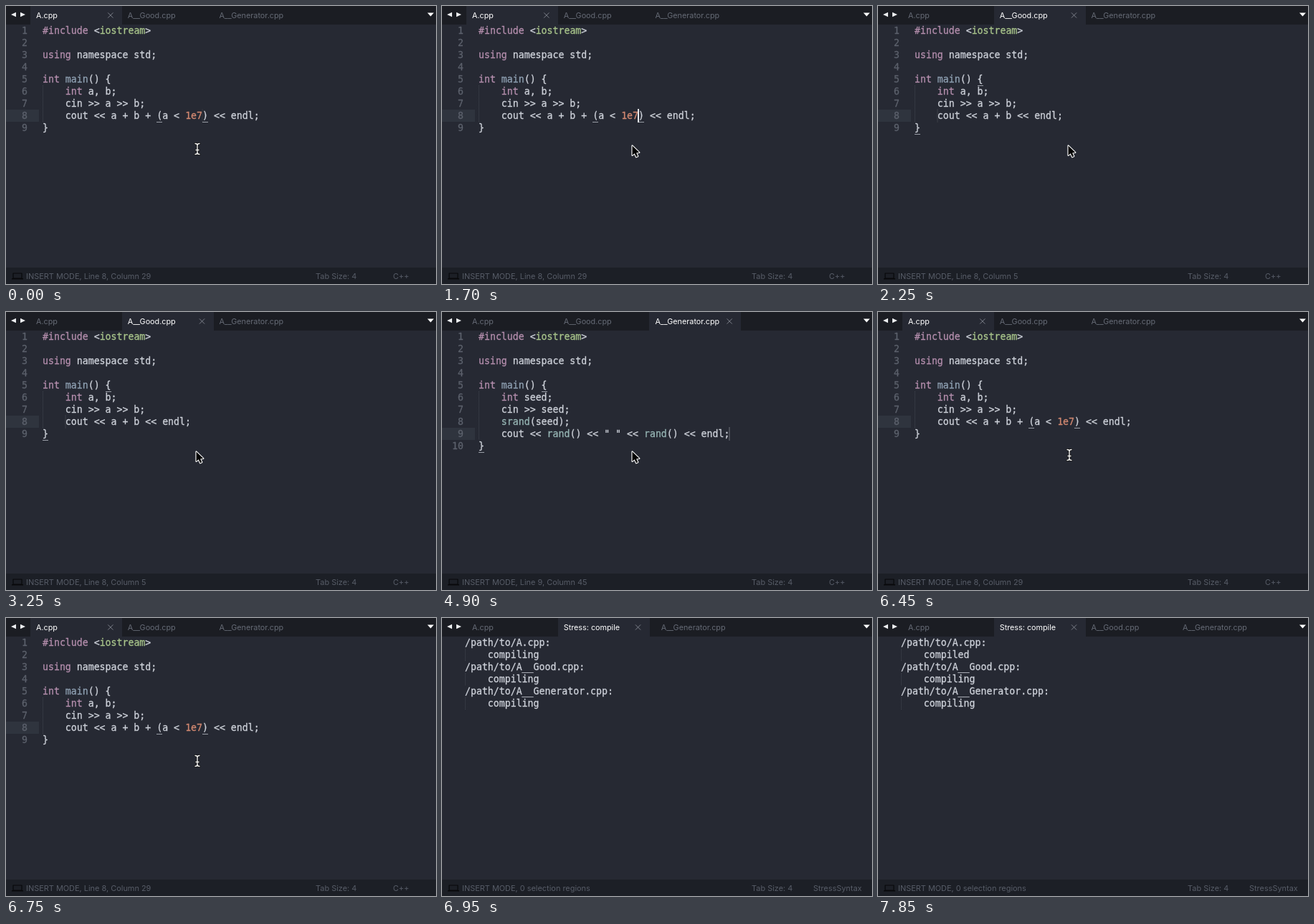
An HTML page with a canvas that plays this animation: 600x389 px, repeating every 8000 ms.

```html
<!DOCTYPE html>
<html lang="en">
<head>
<meta charset="utf-8">
<title>Stress test editor</title>
<style>
  html, body { margin: 0; width: 100%; height: 100%; overflow: hidden; background: #262933; }
  canvas { display: block; }
</style>
</head>
<body>
<canvas id="stage" width="600" height="389"></canvas>
<script>
const ctx = document.getElementById('stage').getContext('2d');
const LOOP = 8000, LINE = 17, TOP = 26, CHAR = 7.965, CODE_X = 51;
const TAB_X = 34, TAB_W = 127.7;
const CODE_FONT = '13.23px "DejaVu Sans Mono", monospace';
const TAB_FONT = '10.8px Inter, sans-serif';
const STATUS_FONT = '10.93px Inter, sans-serif';
const COLORS = {
  bar: '#1b1d23', editor: '#262933', status: '#1c1f26', active: '#2f343e',
  text: '#cdd1d9', dim: '#5c616c', tab: '#656a75', statusText: '#575c67', guide: '#41454f',
  tokens: ['#b48ead', '#a9c58b', '#8fa1b3', '#d08770', '#96b5b4']
};
// keyword, header, definition, number, library call
const TOKENS = /(#include|\busing\b|\bint\b)|(iostream)|(\bmain\b)|(\b1e7\b)|(\bs?rand\b)/g;

const program = body => ['#include <iostream>', '', 'using namespace std;', '', 'int main() {',
  ...body.map(line => '    ' + line), '}'];

// Brackets are [line, column].
const solution = {
  tab: 0, line: 8, column: 29, brackets: [[8, 20], [8, 28]],
  code: program(['int a, b;', 'cin >> a >> b;', 'cout << a + b + (a < 1e7) << endl;'])
};
const good = {
  tab: 1, line: 8, column: 5, brackets: [[5, 11], [9, 0]],
  code: program(['int a, b;', 'cin >> a >> b;', 'cout << a + b << endl;'])
};
const generator = {
  tab: 2, line: 9, column: 45, brackets: [[5, 11], [10, 0]],
  code: program(['int seed;', 'cin >> seed;', 'srand(seed);', 'cout << rand() << " " << rand() << endl;'])
};
// blink is the time of a caret peak.
const SCENES = [
  { start: 0, view: solution, blink: 675 },
  { start: 1850, view: good, blink: 2930 },
  { start: 3950, view: generator, blink: 5195 },
  { start: 5950, view: solution, blink: 6120 }
];
const ARROW_START = 1650, ARROW_END = 6000;
const STRESS_START = 6900, TAB_SLIDE = 310, FIRST_COMPILED = 7800;
const FILES = ['A.cpp', 'A__Good.cpp', 'A__Generator.cpp'];

const clamp = v => Math.max(0, Math.min(1, v));

function rect(x, y, w, h, color) {
  ctx.fillStyle = color;
  ctx.fillRect(x, y, w, h);
}

function label(text, x, y, color, font) {
  ctx.font = font;
  ctx.fillStyle = color;
  ctx.fillText(text, x, y);
}

// Code glyphs get a hairline outline for a slightly heavier weight.
function codeText(text, x, y, color) {
  label(text, x, y, color, CODE_FONT);
  ctx.strokeStyle = color;
  ctx.lineWidth = 0.3;
  ctx.lineJoin = 'round';
  ctx.strokeText(text, x, y);
}

function polygon(points, fill, stroke) {
  ctx.beginPath();
  points.forEach(([x, y]) => ctx.lineTo(x, y));
  ctx.closePath();
  if (stroke) {
    ctx.strokeStyle = stroke;
    ctx.lineWidth = 2.2;
    ctx.lineJoin = 'round';
    ctx.stroke();
  }
  ctx.fillStyle = fill;
  ctx.fill();
}

const lineTop = n => TOP + (n - 1) * LINE;
const baseline = n => lineTop(n) + 13;

function guide(x, from, to) {
  for (let y = lineTop(from); y < lineTop(to + 1); y += 2) rect(x, y, 1, 1, COLORS.guide);
}

function codeLine(text, n) {
  let at = 0;
  const put = (part, color) => {
    codeText(part, CODE_X + at * CHAR, baseline(n), color);
    at += part.length;
  };
  for (const match of text.matchAll(TOKENS)) {
    put(text.slice(at, match.index), COLORS.text);
    put(match[0], COLORS.tokens[match.slice(1).findIndex(Boolean)]);
  }
  put(text.slice(at), COLORS.text);
}

function codeView(view, caret) {
  rect(0, lineTop(view.line), 46, LINE, COLORS.active);
  guide(CODE_X, 6, view.code.length - 1);
  ctx.textAlign = 'right';
  view.code.forEach((_, i) => codeText(i + 1, 30, baseline(i + 1), COLORS.dim));
  ctx.textAlign = 'left';
  view.code.forEach((text, i) => codeLine(text, i + 1));
  for (const [n, column] of view.brackets)
    rect(Math.round(CODE_X + column * CHAR), lineTop(n + 1), 8, 1, '#9a9ea7');
  ctx.globalAlpha = caret;
  rect(Math.round(CODE_X + (view.column - 1) * CHAR) - 1, lineTop(view.line) - 1, 2, 19, '#e6e8ec');
  ctx.globalAlpha = 1;
}

function stressView(t) {
  FILES.forEach((file, i) => {
    const n = i * 2 + 1;
    const state = i === 0 && t >= FIRST_COMPILED ? 'compiled' : 'compiling';
    codeText(`/path/to/${file}:`, 32, baseline(n), COLORS.text);
    codeText(state, 32 + 4 * CHAR, baseline(n + 1), COLORS.text);
    guide(32, n + 1, n + 1);
  });
}

function tabTitle(title, slot, color) {
  label(title, TAB_X + slot * TAB_W + 8, 16.5, color, TAB_FONT);
}

function tabBar(titles, active) {
  rect(0, 0, 600, TOP, COLORS.bar);
  titles.forEach(({ title, slot }) => tabTitle(title, slot, COLORS.tab));
  const x = TAB_X + active.slot * TAB_W;
  rect(Math.round(x), 0, 128, TOP, COLORS.editor);
  tabTitle(active.title, active.slot, '#fff');
  const cx = x + 111.8;
  ctx.strokeStyle = '#7c808a';
  ctx.lineWidth = 1;
  ctx.beginPath();
  ctx.moveTo(cx - 3.6, 9.4); ctx.lineTo(cx + 3.6, 16.6);
  ctx.moveTo(cx + 3.6, 9.4); ctx.lineTo(cx - 3.6, 16.6);
  ctx.stroke();
  polygon([[7, 12], [14, 8.7], [14, 15.3]], '#eceef0');
  polygon([[27, 12], [20, 8.7], [20, 15.3]], '#eceef0');
  polygon([[588, 9.5], [597, 9.5], [592.5, 14.5]], '#fff');
}

function statusBar(message, syntax, syntaxX) {
  rect(0, 366, 600, 23, COLORS.status);
  ctx.strokeStyle = '#08090b';
  ctx.lineWidth = 1.2;
  ctx.strokeRect(10, 374, 12, 7);
  rect(8, 381, 16, 1.5, '#08090b');
  const put = (text, x) => label(text, x, 382, COLORS.statusText, STATUS_FONT);
  put('INSERT MODE, ' + message, 28);
  put('Tab Size: 4', 432);
  put(syntax, syntaxX);
}

function arrowPointer() {
  polygon([[265.5, 195.5], [265.5, 209], [268.7, 206.2], [271, 211.3], [273.3, 210.3],
    [271.1, 205.4], [275.3, 205]], '#000', '#fff');
}

function textPointer() {
  ctx.lineCap = 'round';
  for (const [color, width] of [['#111', 3], ['#f2f2f2', 1.4]]) {
    ctx.strokeStyle = color;
    ctx.lineWidth = width;
    ctx.beginPath();
    ctx.moveTo(264, 192.5); ctx.quadraticCurveTo(267, 192.5, 267, 195);
    ctx.lineTo(267, 205); ctx.quadraticCurveTo(267, 207.5, 264, 207.5);
    ctx.moveTo(270, 192.5); ctx.quadraticCurveTo(267, 192.5, 267, 195);
    ctx.moveTo(270, 207.5); ctx.quadraticCurveTo(267, 207.5, 267, 205);
    ctx.moveTo(265, 201.5); ctx.lineTo(269, 201.5);
    ctx.stroke();
  }
  ctx.lineCap = 'butt';
}

function draw(t) {
  rect(0, 0, 600, 389, COLORS.editor);
  if (t >= STRESS_START) {
    const slide = (1 - Math.cos(Math.PI * clamp((t - STRESS_START) / TAB_SLIDE))) / 2;
    const others = FILES.map((title, i) => ({ title, slot: i ? i + slide : 0 }));
    stressView(t);
    tabBar(others, { title: 'Stress: compile', slot: 1 });
    statusBar('0 selection regions', 'StressSyntax', 518);
    return;
  }
  const { view, blink } = SCENES.findLast(scene => t >= scene.start);
  const tabs = FILES.map((title, slot) => ({ title, slot }));
  codeView(view, clamp(0.4 + 0.8 * Math.cos((t - blink) / 1000 * 2 * Math.PI)));
  tabBar(tabs.filter(tab => tab.slot !== view.tab), tabs[view.tab]);
  statusBar(`Line ${view.line}, Column ${view.column}`, 'C++', 540);
  if (t >= ARROW_START && t < ARROW_END) arrowPointer();
  else textPointer();
}

const began = performance.now();
function frame() {
  draw((performance.now() - began) % LOOP);
  requestAnimationFrame(frame);
}
frame();
</script>
</body>
</html>
```
